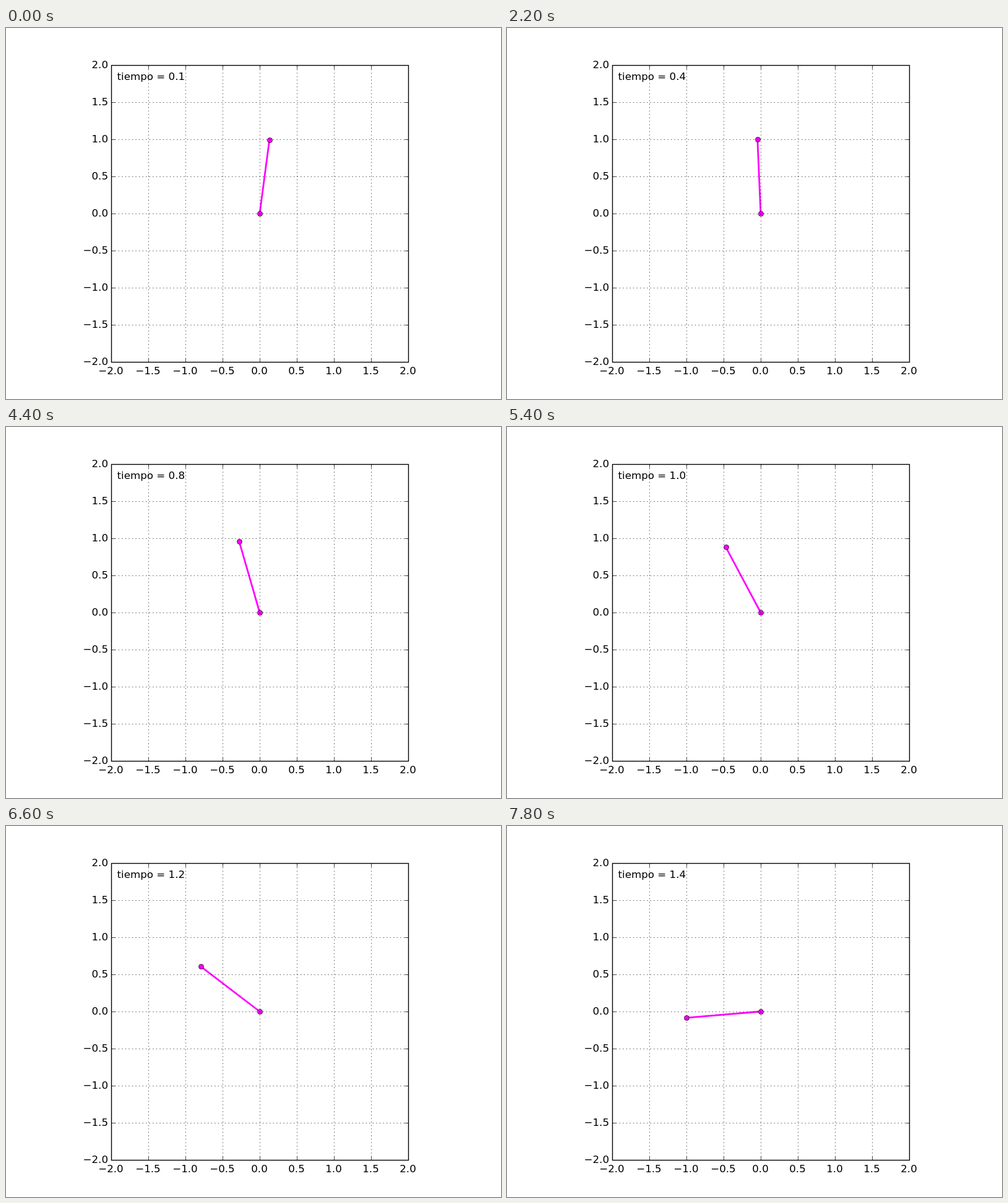
Write an HTML page that moves like this. It is 800 px wide and 600 px high and loops after 8000 ms.

```html
<!DOCTYPE html>
<html lang="es">
<head>
<meta charset="utf-8">
<title>Péndulo invertido</title>
<style>
  html, body { margin: 0; width: 100%; height: 100%; overflow: hidden; background: #fff; }
  svg { display: block; width: 800px; height: 600px; }
  text { font: 16.667px "DejaVu Sans", sans-serif; }
  .thin { stroke: #000; stroke-width: 0.694; fill: none; }
  .grid { stroke-dasharray: 1.389 4.167; }
</style>
</head>
<body>
<svg id="stage" viewBox="0 0 800 600"></svg>
<script>
const stage = document.getElementById('stage');
const LEFT = 170, RIGHT = 650, TOP = 60, BOTTOM = 540;
const UNIT = 120, PIVOT = { x: 410, y: 300 };
const FRAME_MS = 200, FRAMES = 40, DT = 1 / 30, FIRST_STEP = 2;
const GRAVITY = 9.8, SUBSTEPS = 50;

function add(tag, attributes, content = '') {
  const node = document.createElementNS('http://www.w3.org/2000/svg', tag);
  for (const key in attributes) node.setAttribute(key, attributes[key]);
  node.textContent = content;
  return stage.appendChild(node);
}

// Markers sit on pixel centres.
const snap = v => Math.floor(v + 0.5) + 0.5;

function addMarker() {
  return add('circle', { class: 'thin', r: 4, style: 'fill:#f0f' });
}

function moveMarker(marker, x, y) {
  marker.setAttribute('cx', snap(x));
  marker.setAttribute('cy', snap(y));
}

function drawAxes() {
  const path = (d, cls) => add('path', { d, class: cls });
  for (let i = -4; i <= 4; i++) {
    const label = (i < 0 ? '\u2212' : '') + Math.abs(i / 2).toFixed(1);
    const x = PIVOT.x + i * UNIT / 2, y = PIVOT.y - i * UNIT / 2;
    const px = x + 0.5, py = y + 0.5;
    path(`M${px} ${BOTTOM + 0.5}V${TOP + 0.5}`, 'thin grid');
    path(`M${LEFT + 0.5} ${py}H${RIGHT + 0.5}`, 'thin grid');
    path(`M${px} ${BOTTOM + 0.5}v-6M${px} ${TOP + 0.5}v6`, 'thin');
    path(`M${LEFT + 0.5} ${py}h6M${RIGHT + 0.5} ${py}h-6`, 'thin');
    add('text', { x: x - 0.5, y: 560, 'text-anchor': 'middle' }, label);
    add('text', { x: 165, y: y + 5, 'text-anchor': 'end' }, label);
  }
  add('rect', {
    x: LEFT + 0.5, y: TOP + 0.5, width: RIGHT - LEFT, height: BOTTOM - TOP,
    fill: 'none', stroke: '#000', 'stroke-width': 1.389
  });
}

// Inverted pendulum, angle measured from the upright position.
function simulate() {
  let angle = 10 * Math.PI / 180, speed = -40 * Math.PI / 180;
  const h = DT / SUBSTEPS, angles = [];
  const pull = a => GRAVITY * Math.sin(a);
  for (let step = 0; step < FIRST_STEP + FRAMES; step++) {
    angles.push(angle);
    for (let i = 0; i < SUBSTEPS; i++) {
      const before = pull(angle);
      angle += speed * h + before * h * h / 2;
      speed += (before + pull(angle)) * h / 2;
    }
  }
  return angles;
}

const angles = simulate();
const rod = add('line', { x1: PIVOT.x, y1: PIVOT.y, stroke: '#f0f', 'stroke-width': 2.778 });
const pivot = addMarker(), bob = addMarker();
moveMarker(pivot, PIVOT.x, PIVOT.y);
drawAxes();
const clock = add('text', { x: 179.6, y: 84 });

function render(ms) {
  const step = FIRST_STEP + Math.floor(ms / FRAME_MS) % FRAMES;
  const x = PIVOT.x + UNIT * Math.sin(angles[step]);
  const y = PIVOT.y - UNIT * Math.cos(angles[step]);
  rod.setAttribute('x2', x);
  rod.setAttribute('y2', y);
  moveMarker(bob, x, y);
  clock.textContent = `tiempo = ${(step * DT).toFixed(1)}`;
}

const start = performance.now();
function tick() {
  render(performance.now() - start);
  requestAnimationFrame(tick);
}
tick();
</script>
</body>
</html>
```
